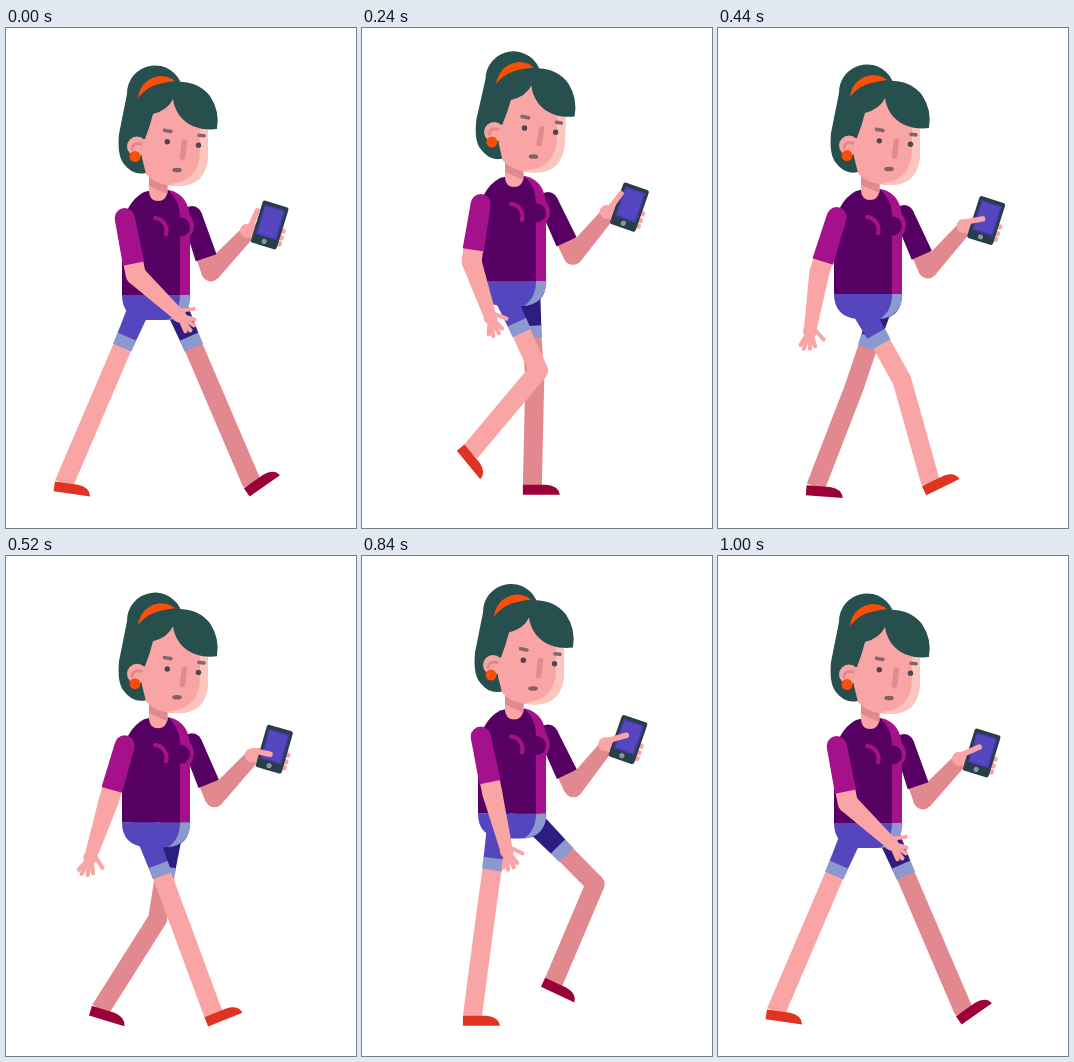
Recreate the animation shown at these times as an HTML page with a canvas. Size 350 by 500 pixels, loop 1040 ms.

```html
<!DOCTYPE html>
<html lang="en">
<head>
<meta charset="utf-8">
<title>Walking with a phone</title>
<style>
html, body { margin: 0; width: 100%; height: 100%; overflow: hidden; background: #fff; }
canvas { display: block; width: 350px; height: 500px; }
</style>
</head>
<body>
<canvas id="stage"></canvas>
<script>
const LOOP = 1040, STEP = 40, HALF = 480, FULL = 1000;
const C = {
  skin: '#faa5a5', shade: '#e2888f', glow: '#fcc6bf', hair: '#274f4d', orange: '#fb4e06',
  top: '#560064', pink: '#a5118b', shorts: '#5546bd', farShorts: '#2b1e80', cuff: '#8c99cf',
  shoe: '#e03321', farShoe: '#9b0038', phone: '#273d48', screen: '#5646c0'
};

const canvas = document.getElementById('stage');
const ctx = canvas.getContext('2d');
const dpr = window.devicePixelRatio || 1;
canvas.width = 350 * dpr;
canvas.height = 500 * dpr;

// Smooth curve through keys without overshoot.
function ease(times, values, t) {
  const last = times.length - 1;
  const secant = i => (values[i + 1] - values[i]) / (times[i + 1] - times[i]);
  const slope = i => {
    if (i === 0) return secant(0);
    if (i === last) return secant(last - 1);
    const a = secant(i - 1), b = secant(i);
    return a * b <= 0 ? 0 : 2 * a * b / (a + b);
  };
  let i = 0;
  while (i < last - 1 && t > times[i + 1]) i++;
  const h = times[i + 1] - times[i], u = (t - times[i]) / h, v = 1 - u;
  return v * v * (1 + 2 * u) * values[i] + u * v * v * h * slope(i)
    + u * u * (3 - 2 * u) * values[i + 1] - u * u * v * h * slope(i + 1);
}

const BODY_T = [0, 120, 360, 520, 680, 840, 1000];
const LEG_T = [0, 40, 120, 185, 360, 480, 520, 610, 680, 840, 1000];

const body = {
  head: [0, 3, 0, 0, 3, 0, 0],
  upper: [11, 4, -18, -16, -2, 11.6, 11],
  fore: [47, 32, 5, -18, -5, 14, 47],
  farUpper: [18.7, 24, 25.4, 22.3, 26.4, 25.4, 18.7],
  phoneX: [263.7, 266.5, 268, 268.3, 267, 266, 263.7],
  phoneY: [-70, -73.5, -74, -73, -76, -74, -70],
  phoneTurn: [17, 18.5, 19.5, 16, 19, 19, 17],
  thumbX: [-16, -16.5, -6.5, -2.7, -3, -3, -4],
  thumbY: [-10, -11, -7.3, 6, 7.5, -3.5, -5]
};
const nearLeg = {
  thigh: [-23.2, -9, 1, 13.9, 39.8, 23.2, 20.3, 13.4, 6.8, -8, -23.2],
  shin: [-23.2, -32, -39.5, -44.6, -13.6, 23.2, 20.3, 13.4, 6.8, -7.5, -23.2],
  foot: [8, 17, 37, 58, 10, -35, -22, 0, 0, 0, 8]
};
const farLeg = {
  thigh: [23.2, 20.3, 13.4, 6.8, -2.5, -23.2, -9, 1, 13.9, 44.6, 23.2],
  shin: [23.2, 20.3, 13.4, 6.8, -18, -23.2, -32.3, -39.5, -44.6, -23, 23.2],
  foot: [-35, -22, 0, 0, 0, 8, 17, 37, 60, 25, -35]
};

function pose(keys, times, t) {
  const out = {};
  for (const k in keys) out[k] = ease(times, keys[k], t);
  return out;
}

const rad = deg => deg * Math.PI / 180;
// Angles hang from straight down, positive is forward.
const along = (p, deg, d) => [p[0] + d * Math.sin(rad(deg)), p[1] + d * Math.cos(rad(deg))];

function fill(path, color) {
  ctx.fillStyle = color;
  ctx.fill(new Path2D(path));
}
function stroke(path, color, width, cap = 'round') {
  ctx.strokeStyle = color;
  ctx.lineWidth = width;
  ctx.lineCap = cap;
  ctx.lineJoin = 'round';
  ctx.stroke(new Path2D(path));
}
function oval(x, y, rx, ry, color) {
  ctx.fillStyle = color;
  ctx.beginPath();
  ctx.ellipse(x, y, rx, ry, 0, 0, 7);
  ctx.fill();
}
const dot = (x, y, r, color) => oval(x, y, r, r, color);

function taper(a, b, wa, wb, color) {
  const dx = b[0] - a[0], dy = b[1] - a[1], len = Math.hypot(dx, dy);
  const nx = -dy / len / 2, ny = dx / len / 2;
  fill(`M${a[0] + nx * wa} ${a[1] + ny * wa}L${b[0] + nx * wb} ${b[1] + ny * wb}
    L${b[0] - nx * wb} ${b[1] - ny * wb}L${a[0] - nx * wa} ${a[1] - ny * wa}Z`, color);
}
function place(x, y, deg, draw) {
  ctx.save();
  ctx.translate(x, y);
  ctx.rotate(rad(deg));
  draw();
  ctx.restore();
}

function leg(hip, a, skin, cloth, shoe) {
  const knee = along(hip, a.thigh, 95);
  const ankle = along(knee, a.shin, 106);
  const end = along(ankle, a.shin, 1);
  const start = along(hip, a.thigh, 45);
  stroke(`M${start}L${knee}L${end}`, skin, 19, 'butt');
  place(ankle[0], ankle[1], a.foot, () =>
    fill('M-9.5 0H14Q26 1 27.5 10H-9.5Z', shoe));
  dot(hip[0], hip[1], 11.5, cloth);
  taper(hip, along(hip, a.thigh, 43), 23, 20, cloth);
  taper(along(hip, a.thigh, 42), along(hip, a.thigh, 54), 20.5, 20, C.cuff);
}

function farArm(p, waist) {
  const shoulder = [186, waist - 79];
  const elbow = along(shoulder, p.farUpper, 59);
  const phone = [p.phoneX, waist + p.phoneY];
  const wrist = [phone[0] - 23, phone[1] + 9];
  taper(along(shoulder, p.farUpper, 40), elbow, 19, 19, C.shade);
  dot(elbow[0], elbow[1], 9.5, C.shade);
  taper(elbow, wrist, 19, 15, C.shade);
  dot(shoulder[0], shoulder[1], 10, C.top);
  taper(shoulder, along(shoulder, p.farUpper, 44), 20, 22, C.top);

  place(phone[0], phone[1], p.phoneTurn, () => {
    stroke('M-20 12L-8 8', C.skin, 14);
    for (const y of [2, 9, 15]) stroke(`M8 ${y}H14.5`, C.skin, 5.5);
    ctx.fillStyle = C.phone;
    ctx.beginPath();
    ctx.roundRect(-13.5, -22, 27, 44, 2.5);
    ctx.fill();
    ctx.fillStyle = C.screen;
    ctx.fillRect(-10.5, -18, 21, 30.5);
    ctx.strokeStyle = '#4639ae';
    ctx.lineWidth = 1.5;
    ctx.strokeRect(-10, -17.5, 20, 29.5);
    dot(-0.5, 17.3, 2.6, '#84979a');
    stroke(`M-18 7L${p.thumbX} ${p.thumbY}`, C.skin, 5.5);
  });
}

function nearArm(p, waist) {
  const shoulder = [118.7, waist - 77];
  const elbow = along(shoulder, p.upper, 58);
  const wrist = along(elbow, p.fore, 55);
  taper(along(shoulder, p.upper, 42), elbow, 20, 20, C.skin);
  dot(elbow[0], elbow[1], 10, C.skin);
  taper(elbow, wrist, 20, 13, C.skin);
  place(wrist[0], wrist[1], -p.fore, () => {
    oval(0, 4, 7, 8, C.skin);
    const fingers = [[-22, 21], [-9, 23], [8, 22], [24, 20]];
    for (const [deg, len] of fingers) stroke(`M0 3L${along([0, 2], deg, len - 2)}`, C.skin, 4.2);
    stroke(`M2 0L${along([2, 1], 53, 16)}`, C.skin, 4);
  });
  dot(shoulder[0], shoulder[1], 10, C.pink);
  taper(shoulder, along(shoulder, p.upper, 46.5), 20, 21.5, C.pink);
}

function torso() {
  fill('M116 0H184Q184 25 160 25H140Q116 23 116 0Z', C.shorts);
  fill('M174 0H184.5Q184 22 162 25Q174 17 174 0Z', C.cuff);
  oval(178, -69, 10, 13, C.pink);
  fill('M150 -105H163Q184 -100 184 -74V0H150Z', C.pink);
  fill('M116 0V-62Q118 -92 138 -103Q151 -107 163 -104Q174 -94 174 -78V0Z', C.top);
  dot(174.5, -68, 9.5, C.top);
  stroke('M149 -77A12.5 12.5 0 0 1 160 -61', C.pink, 4.2);
}

function neck() {
  fill('M143 -122H161.5V-103Q160 -94 152 -94Q144 -94 143 -103Z', C.skin);
  fill('M143 -122H161.5V-101L143 -109Z', C.shade);
}

function head() {
  fill('M121 66A28 28 0 0 1 176 58L170 100L140 145Q127 148 118 136Q111 128 113 106Z', C.hair);
  fill('M131 77Q132 51 154 48Q163 48 169 53Q144 56 133 77Z', C.orange);
  fill('M134 90L166 62L202 95V128Q200 158 172 158Q150 158 140 146L136 130Z', C.skin);
  fill('M194 95H202V128Q200 158 172 158Q167 158 163 156Q194 154 194 122Z', C.glow);
  fill('M168 54Q191 52 204 68Q214 83 211 101C188 104 170 92 167 71Q162 82 147 86Q144 98 139 111H128V76Q140 54 168 54Z', C.hair);
  dot(131, 118.5, 10, C.skin);
  stroke('M126 121Q127 114 135 116', C.shade, 3);
  dot(129, 128.5, 5.5, C.orange);
  stroke('M158.5 102.3L165 103.5M193 107.2L198 107.8', '#86666a', 3.6);
  dot(161.3, 113.8, 2.7, '#4b4750');
  dot(192.5, 117.2, 2.7, '#4b4750');
  stroke('M178.5 114L176.5 129', C.shade, 5.5);
  oval(171, 142, 4.8, 2.3, '#80606a');
}

function waistHeight(t) {
  const turn = t < HALF ? t / HALF : (t - HALF) / (FULL - HALF);
  return 260 + 7 * Math.cos(2 * Math.PI * turn);
}

function draw(t) {
  const p = pose(body, BODY_T, t);
  const waist = waistHeight(t);
  ctx.setTransform(dpr, 0, 0, dpr, 0, 0);
  ctx.fillStyle = '#fff';
  ctx.fillRect(0, 0, 350, 500);

  farArm(p, waist);
  leg([166.5, waist + 3], pose(farLeg, LEG_T, t), C.shade, C.farShorts, C.farShoe);
  leg([137.5, waist + 3], pose(nearLeg, LEG_T, t), C.skin, C.shorts, C.shoe);
  place(0, waist, 0, () => { torso(); neck(); });
  place(152, waist - 107, p.head, () => {
    ctx.translate(-152, -160);
    head();
  });
  nearArm(p, waist);
}

const begin = performance.now();
function tick() {
  const t = (performance.now() - begin) % LOOP;
  draw(Math.floor(t / STEP) * STEP);
  requestAnimationFrame(tick);
}
tick();
</script>
</body>
</html>
```
